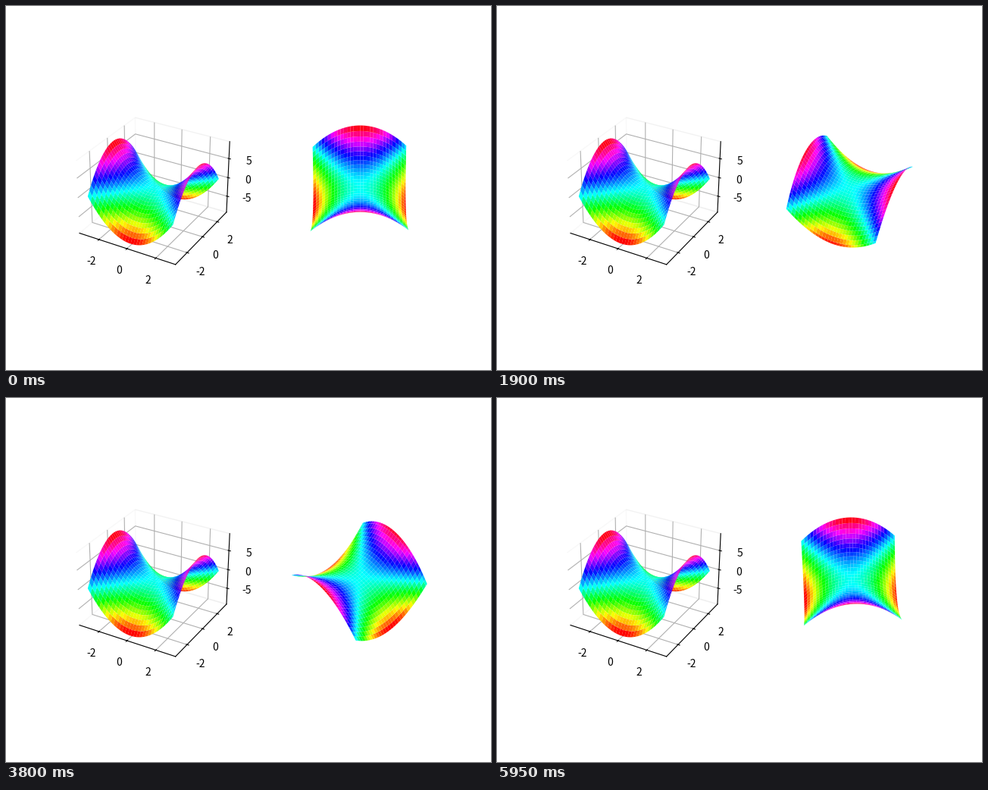
Animation, 640 px wide and 480 px high, one loop 6 s. Source, as a matplotlib script:

```python
import matplotlib.pyplot as plt
import numpy as np
from matplotlib.animation import FuncAnimation

plt.rcParams["font.family"] = "Noto Sans CJK JP"
plt.rcParams["axes.unicode_minus"] = False

FRAMES = 120
INTERVAL = 50
ELEV = 60

side = np.arange(-3, 3, 0.1)
x, y = np.meshgrid(side, side)
z = x**2 - y**2

fig = plt.figure(figsize=(6.4, 4.8), dpi=100)


def add_saddle(slot):
    ax = fig.add_subplot(1, 2, slot, projection="3d")
    ax.plot_surface(x, y, z, cmap="hsv")
    return ax


fixed = add_saddle(1)
for axis in (fixed.xaxis, fixed.yaxis, fixed.zaxis):
    axis.pane.set_fill(False)

spinning = add_saddle(2)
spinning.set_axis_off()


def update(i):
    spinning.view_init(elev=ELEV, azim=i * 360 / FRAMES)
    return []


anim = FuncAnimation(fig, update, frames=FRAMES, interval=INTERVAL,
                     repeat=True, repeat_delay=0)

plt.show()
```
